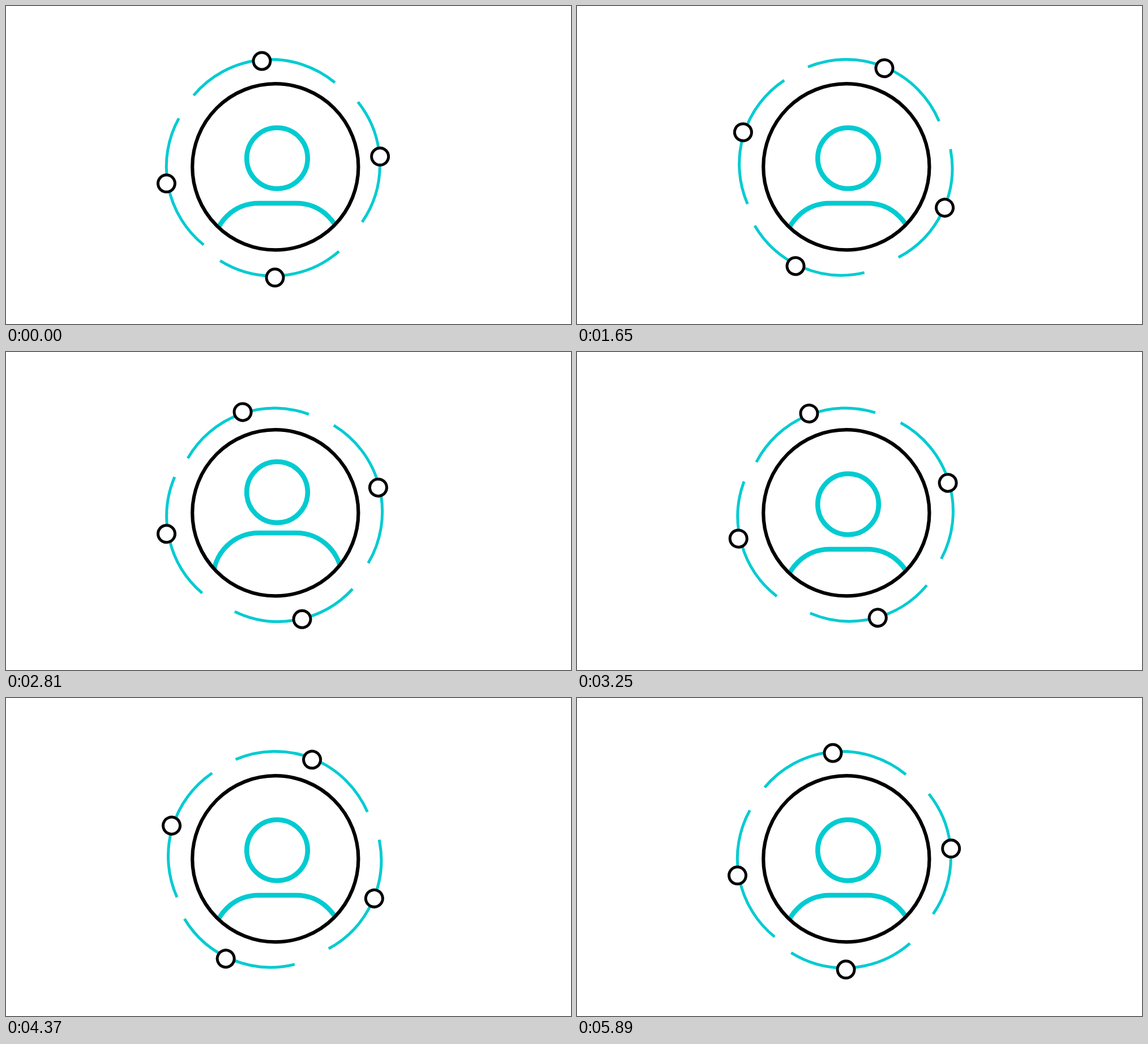
Write an HTML page that moves like this. It is 998 px wide and 561 px high and loops after 5930 ms.

```html
<!DOCTYPE html>
<html lang="en">
<head>
<meta charset="utf-8">
<title>Profile orbit</title>
<style>
html, body { margin: 0; width: 100%; height: 100%; overflow: hidden; background: #fff; }
svg { display: block; width: 998px; height: 561px; }
</style>
</head>
<body>
<svg viewBox="0 0 998 561">
  <defs>
    <clipPath id="badge"><circle cx="475.8" cy="283.8" r="145"/></clipPath>
  </defs>
  <g clip-path="url(#badge)" fill="none" stroke="#00cbd1" stroke-width="8.6">
    <circle id="head" cx="479" cy="268.5" r="53.8"/>
    <path id="body" d="M366 428A80 80 0 0 1 446 348H513A80 80 0 0 1 593 428"/>
  </g>
  <circle cx="475.8" cy="283.8" r="146.6" fill="none" stroke="#000" stroke-width="6.2"/>
  <g id="orbit">
    <g id="arcs" fill="none" stroke="#00cbd1" stroke-width="5"></g>
    <g id="dots" fill="#fff" stroke="#000" stroke-width="5"></g>
  </g>
</svg>
<script>
const LOOP = 5930, STEP = 40;
const PIVOT = "471.7 288.1";
const SPIN = { start: 1050, half: 1952, angle: 90 };
const HOP = { starts: [2142, 4701], half: 488, lag: 111, height: 30.2 };

// Polar [angle, radius] around the pivot: arc start, arc end, dot; then the arc's own radius.
const PARTS = [
  { from: [-137.1, 191.5], to: [-54.5, 188.1], dot: [-95.9, 192.1], r: 178 },
  { from: [-38.4, 191.3], to: [30.6, 182.8], dot: [-6.8, 190.3], r: 178 },
  { from: [51.2, 185.8], to: [120.1, 186.5], dot: [89, 191], r: 178 },
  { from: [132.6, 181.1], to: [208.4, 189.2], dot: [172.45, 189.9], r: 177 }
];

const byId = id => document.getElementById(id);
const head = byId("head"), body = byId("body"), orbit = byId("orbit");

function polar([deg, r]) {
  const a = deg * Math.PI / 180;
  return [r * Math.cos(a), r * Math.sin(a)];
}

function add(parent, tag, attrs) {
  const el = document.createElementNS("http://www.w3.org/2000/svg", tag);
  for (const key in attrs) el.setAttribute(key, attrs[key]);
  byId(parent).appendChild(el);
}

for (const p of PARTS) {
  const [cx, cy] = polar(p.dot);
  add("arcs", "path", { d: `M${polar(p.from)}A${p.r} ${p.r} 0 0 1 ${polar(p.to)}` });
  add("dots", "circle", { cx, cy, r: 15 });
}

function spinAt(t) {
  const phase = (t - SPIN.start) / SPIN.half;
  return SPIN.angle * Math.max(0, 1 - Math.abs(phase - 1));
}

function hopAt(t) {
  let lift = 0;
  for (const start of HOP.starts) {
    const phase = (t - start) / HOP.half;
    if (phase > 0 && phase < 2) lift = HOP.height * (1 - Math.cos(Math.PI * phase)) / 2;
  }
  return -lift;
}

function draw(t) {
  orbit.setAttribute("transform", `translate(${PIVOT}) rotate(${spinAt(t)})`);
  head.setAttribute("transform", `translate(0 ${hopAt(t)})`);
  body.setAttribute("transform", `translate(0 ${hopAt(t - HOP.lag)})`);
}

const origin = performance.now();
function tick() {
  const t = (performance.now() - origin) % LOOP;
  draw(Math.floor((t - 10) / STEP) * STEP + 10);
  requestAnimationFrame(tick);
}
tick();
</script>
</body>
</html>
```
